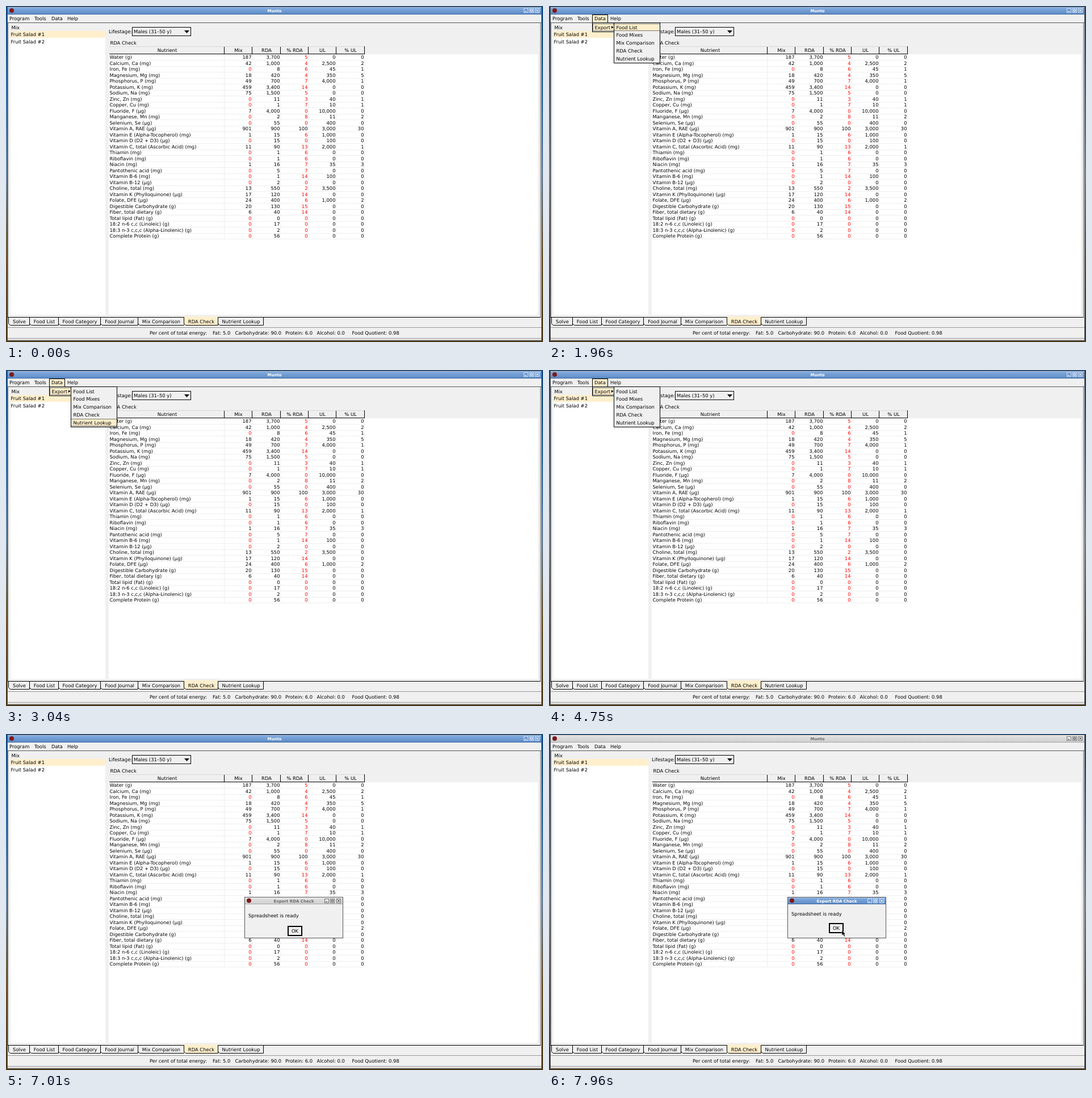
Animation, 946 px wide and 592 px high, one loop 8000 ms. Source, as an HTML page with a canvas:

```html
<!DOCTYPE html>
<html lang="en">
<head>
<meta charset="utf-8">
<title>Munto</title>
<style>
html, body { margin: 0; width: 100%; height: 100%; overflow: hidden; }
canvas { display: block; }
</style>
</head>
<body>
<canvas id="stage" width="946" height="592"></canvas>
<script>
const ctx = document.getElementById('stage').getContext('2d');
const LOOP = 8000;
const FACE = '"DejaVu Sans", sans-serif';
const GREY = '#f0f0f0', CREAM = '#ffefcc', INK = '#000', RED = '#f00';

const rows = `Water (g)|187|3,700|5|0|0
Calcium, Ca (mg)|42|1,000|4|2,500|2
Iron, Fe (mg)|0|8|6|45|1
Magnesium, Mg (mg)|18|420|4|350|5
Phosphorus, P (mg)|49|700|7|4,000|1
Potassium, K (mg)|459|3,400|14|0|0
Sodium, Na (mg)|75|1,500|5|0|0
Zinc, Zn (mg)|0|11|3|40|1
Copper, Cu (mg)|0|1|7|10|1
Fluoride, F (µg)|7|4,000|0|10,000|0
Manganese, Mn (mg)|0|2|8|11|2
Selenium, Se (µg)|0|55|0|400|0
Vitamin A, RAE (µg)|901|900|100|3,000|30
Vitamin E (Alpha-Tocopherol) (mg)|1|15|6|1,000|0
Vitamin D (D2 + D3) (µg)|0|15|0|100|0
Vitamin C, total (Ascorbic Acid) (mg)|11|90|13|2,000|1
Thiamin (mg)|0|1|6|0|0
Riboflavin (mg)|0|1|6|0|0
Niacin (mg)|1|16|7|35|3
Pantothenic acid (mg)|0|5|7|0|0
Vitamin B-6 (mg)|0|1|14|100|0
Vitamin B-12 (µg)|0|2|0|0|0
Choline, total (mg)|13|550|2|3,500|0
Vitamin K (Phylloquinone) (µg)|17|120|14|0|0
Folate, DFE (µg)|24|400|6|1,000|2
Digestible Carbohydrate (g)|20|130|15|0|0
Fiber, total dietary (g)|6|40|14|0|0
Total lipid (Fat) (g)|0|0|0|0|0
18:2 n-6 c,c (Linoleic) (g)|0|17|0|0|0
18:3 n-3 c,c,c (Alpha-Linolenic) (g)|0|2|0|0|0
Complete Protein (g)|0|56|0|0|0`.split('\n').map(r => r.split('|'));

const heads = ['Nutrient', 'Mix', 'RDA', '% RDA', 'UL', '% UL'];
const edges = [182, 384, 433, 483, 532, 581, 631];
const tabs = ['Solve', 'Food List', 'Food Category', 'Food Journal', 'Mix Comparison', 'RDA Check', 'Nutrient Lookup'];
const tabEdges = [4, 41, 92, 166, 232, 313, 373, 453];
const exportItems = ['Food List', 'Food Mixes', 'Mix Comparison', 'RDA Check', 'Nutrient Lookup'];

// [start time, highlighted export item]; -1 is none
const hover = [[0, -1], [1960, 0], [2460, 1], [2640, -1], [2680, 2], [2790, -1],
  [2830, 3], [3000, -1], [3040, 4], [4750, -1], [4790, 3]];

function fill(x, y, w, h, color) {
  ctx.fillStyle = color;
  ctx.fillRect(x, y, w, h);
}

function frame(x, y, w, h, color = INK) {
  ctx.strokeStyle = color;
  ctx.lineWidth = 1;
  ctx.strokeRect(x + .5, y + .5, w - 1, h - 1);
}

function box(x, y, w, h, back, border = INK) {
  fill(x, y, w, h, back);
  frame(x, y, w, h, border);
}

function poly(points, color) {
  ctx.beginPath();
  points.forEach(([x, y]) => ctx.lineTo(x, y));
  ctx.closePath();
  ctx.fillStyle = color;
  ctx.fill();
}

// y is the middle of the line
function text(s, x, y, { align = 'left', color = INK, font = `8.4px ${FACE}` } = {}) {
  ctx.font = font;
  ctx.textRendering = 'geometricPrecision';
  ctx.textAlign = align;
  ctx.fillStyle = color;
  ctx.fillText(s, x, y + 3);
}

function vertical(y0, y1, ...colors) {
  const g = ctx.createLinearGradient(0, y0, 0, y1);
  colors.forEach((c, i) => g.addColorStop(i / (colors.length - 1), c));
  return g;
}

function titleBar(x, y, w, h, label, active, buttons) {
  fill(x, y, w, h, active ? vertical(y, y + h, '#86aede', '#5b8ac6') : vertical(y, y + h, '#e2e2e2', '#cfcfcf'));
  fill(x, y, w, 1, active ? '#a9c6ea' : '#f2f2f2');
  fill(x, y + h - 1, w, 1, active ? '#3f689d' : '#a5a5a5');
  text(label, x + w / 2, y + h / 2 - .5, {
    align: 'center', color: active ? '#fff' : '#6a6a6a', font: `bold 7px ${FACE}`
  });
  const ink = active ? '#fff' : '#444';
  buttons.forEach((bx, i) => {
    const by = y + 2;
    box(bx, by, 8, 8, active ? '#6f9ad2' : '#e4e4e4', active ? '#d3e2f5' : '#777');
    if (i === 0) fill(bx + 2, by + 5, 3, 1, ink);
    if (i === 1) frame(bx + 2, by + 2, 4, 4, ink);
    if (i === 2) {
      ctx.strokeStyle = ink;
      ctx.beginPath();
      ctx.moveTo(bx + 2, by + 2); ctx.lineTo(bx + 6, by + 6);
      ctx.moveTo(bx + 6, by + 2); ctx.lineTo(bx + 2, by + 6);
      ctx.stroke();
    }
  });
}

function dot(x, y) {
  ctx.beginPath();
  ctx.arc(x, y, 4, 0, Math.PI * 2);
  ctx.fillStyle = '#7d1a1a';
  ctx.fill();
}

function drawWindow(active) {
  fill(0, 0, 946, 592, vertical(0, 592, '#0e4580', '#2c6cae', '#6d8ba8', '#6b5226', '#4a3716'));
  fill(2, 1, 942, 589, '#d4d4d4');
  frame(2, 1, 942, 589, '#555');
  fill(3, 15, 940, 572, GREY);
  titleBar(3, 2, 940, 13, 'Munto', active, [912, 922, 932]);
  dot(10, 8);

  [['Program', 6], ['Tools', 50], ['Data', 80], ['Help', 108]].forEach(([s, x]) => text(s, x, 22));
  fill(3, 29, 940, 1, '#555');
  fill(3, 30, 1, 518, '#777');
  fill(941, 30, 1, 518, '#777');
}

function drawList() {
  text('Mix', 9.5, 37.5);
  fill(8, 44, 167, 500, '#fff');
  fill(8, 44, 167, 12, CREAM);
  text('Fruit Salad #1', 8.5, 50);
  text('Fruit Salad #2', 8.5, 62.5);
}

function drawTable() {
  text('Lifestage:', 181, 45);
  box(222, 37, 104, 16, GREY);
  text('Males (31–50 y)', 225, 45);
  poly([[314, 43], [323, 43], [318.5, 48]], INK);
  text('RDA Check', 183.5, 64.5);

  fill(181, 85, 756, 459, '#fff');
  const pitch = 10.5, bottom = 85 + rows.length * pitch;
  edges.slice(1).forEach(x => fill(x, 85, 1, bottom - 85, '#eee'));
  rows.forEach((row, i) => {
    const y = 90 + i * pitch;
    fill(182, Math.round(y + 5), 449, 1, '#eee');
    row.forEach((s, c) => {
      const low = c === 1 && s === '0' || c === 3 && +s < 100;
      if (c) text(s, edges[c + 1] - .5, y, { align: 'right', color: low ? RED : INK });
      else text(s, 182.5, y);
    });
  });

  heads.forEach((s, c) => {
    text(s, (edges[c] + edges[c + 1]) / 2 + 1, 78, { align: 'center' });
    fill(edges[c + 1], 71, 1, 14, INK);
  });
  fill(182, 71, 449, 1, '#d8d8d8');
  fill(182, 84, 450, 1, INK);
}

function drawTabs() {
  fill(3, 548, 939, 1, INK);
  tabs.forEach((s, i) => {
    const x = tabEdges[i] + .5, r = tabEdges[i + 1] + .5, on = s === 'RDA Check';
    if (on) fill(x, 547, r - x, 15, CREAM);
    ctx.strokeStyle = INK;
    ctx.lineWidth = 1;
    ctx.beginPath();
    ctx.moveTo(x, 548);
    ctx.lineTo(x, 559.5);
    ctx.lineTo(x + 3, 562.5);
    ctx.lineTo(r, 562.5);
    ctx.lineTo(r, 548);
    ctx.stroke();
    text(s, (x + r) / 2 + .5, 556, { align: 'center' });
  });
  fill(3, 566, 940, 1, '#999');
  fill(3, 585, 940, 1, '#999');
  [['Per cent of total energy:', 253], ['Fat: 5.0', 364], ['Carbohydrate: 90.0', 403.5], ['Protein: 6.0', 492],
    ['Alcohol: 0.0', 547.5], ['Food Quotient: 0.98', 609.5]].forEach(([s, x]) => text(s, x, 576));
}

function drawMenu(t) {
  box(76, 15, 28, 15, CREAM);
  text('Data', 80, 22);
  if (t < 540) return;

  box(76, 29, 40, 17, GREY);
  if (t >= 980) box(77, 31, 39, 13, CREAM, '#7d7564');
  text('Export', 80.5, 37.5);
  poly([[110, 35], [113.5, 37.5], [110, 40]], INK);
  if (t < 1180) return;

  box(114, 29, 82, 72, GREY);
  const item = hover.filter(h => h[0] <= t).pop()[1];
  exportItems.forEach((s, i) => {
    const y = Math.round(31 + i * 13.7);
    if (i === item) {
      fill(115, y, 80, 13, CREAM);
      fill(115, y, 80, 1, '#7d7564');
      fill(115, y + 12, 80, 1, '#7d7564');
    }
    text(s, 118.5, 37.5 + i * 13.75);
  });
}

function drawDialog(active) {
  const y = active ? 333 : 338, x = active ? 494 : 497;
  box(420, 287, 174, 73, GREY, '#555');
  titleBar(421, 288, 172, 12, 'Export RDA Check', active, [561, 571, 582]);
  dot(428, 293.5);
  text('Spreadsheet is ready', 427, active ? 316.5 : 319.5);
  box(x - 1, y, 26, 18, GREY);
  frame(x, y + 1, 24, 16);
  text('OK', x + 12, y + 9, { align: 'center' });
}

function drawPointer(t) {
  const step = Math.min(9, Math.floor((t - 7590) / 41));
  const mix = (a, b, k) => a + (b - a) * k;
  const k = step < 6 ? Math.sin(step / 6 * Math.PI / 2) : (step - 6) / 3;
  const x = Math.round(step < 6 ? mix(483, 537, k) : mix(537, 516, k));
  const y = Math.round(step < 6 ? mix(287, 350, k) : mix(350, 346, k));
  const arrow = [[0, 0], [0, 9], [2, 7], [4, 11], [5.5, 10], [4, 6.5], [6.5, 6.5]];
  poly(arrow.map(([px, py]) => [x + px, y + py]), INK);
  ctx.strokeStyle = '#fff';
  ctx.lineWidth = .5;
  ctx.stroke();
}

function draw(t) {
  drawWindow(t < 7080);
  drawList();
  drawTable();
  drawTabs();
  if (t >= 500 && t < 7010) drawMenu(t);
  if (t >= 7010) drawDialog(t >= 7080);
  if (t >= 7590) drawPointer(t);
}

const start = performance.now();
function tick() {
  draw((performance.now() - start) % LOOP);
  requestAnimationFrame(tick);
}
draw(0);
requestAnimationFrame(tick);
</script>
</body>
</html>
```
